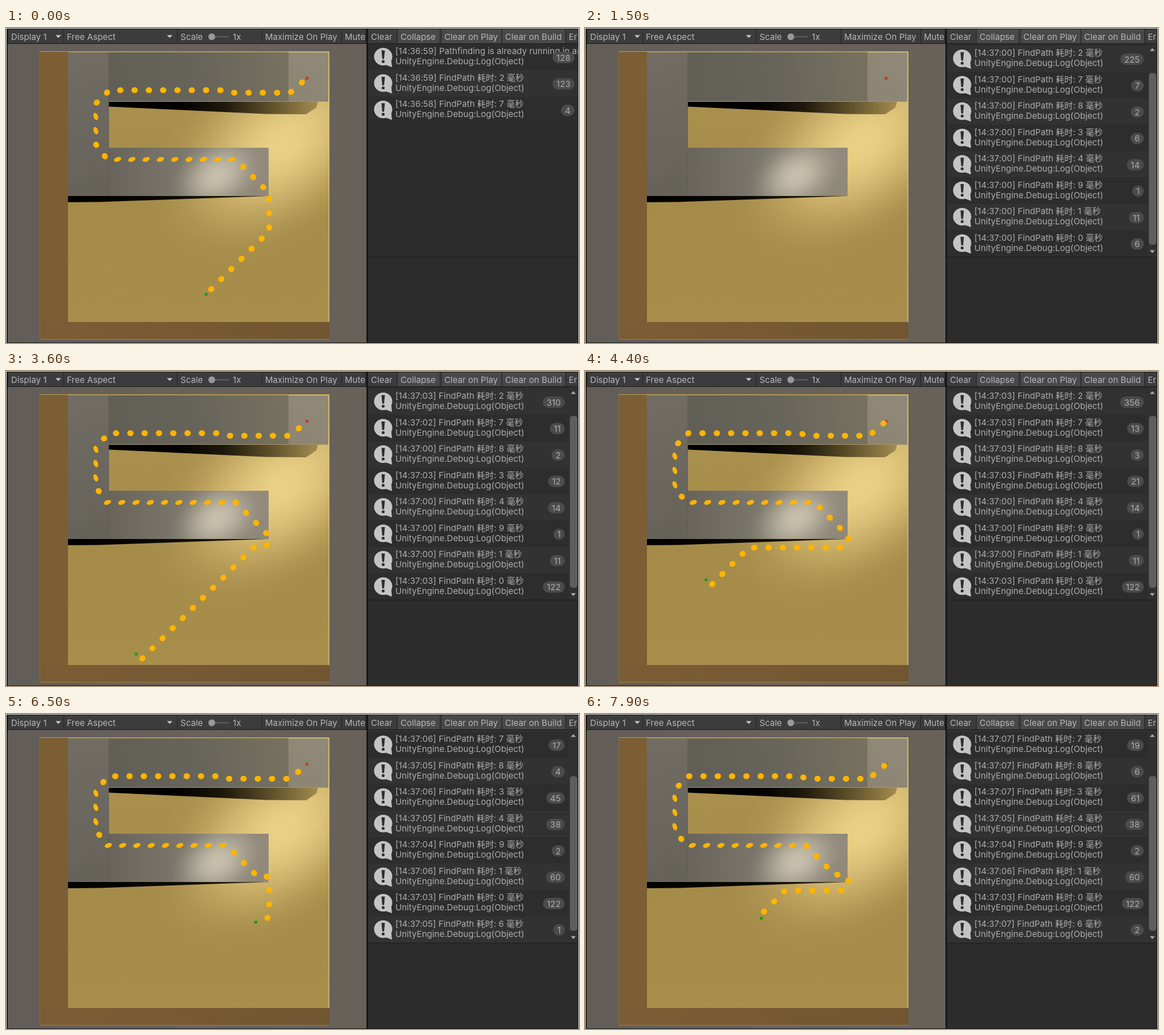
Recreate the animation shown at these times as an HTML page with a canvas. Size 1008 by 555 pixels, loop 8000 ms.

```html
<!DOCTYPE html>
<html lang="en">
<head>
<meta charset="utf-8">
<style>
html, body { margin: 0; width: 100%; height: 100%; overflow: hidden; background: #191919; }
canvas { display: block; }
</style>
</head>
<body>
<canvas id="stage" width="1008" height="555"></canvas>
<script>
const LOOP = 8000, STEP = 100, ROW = 46.5, LIST_TOP = 28, LIST_H = 375, SPACING = 25.15;
const FONT = '15px Inter, "Noto Sans CJK SC", "Noto Sans CJK", sans-serif';
let g;

function rect(x, y, w, h, color) { g.fillStyle = color; g.fillRect(x, y, w, h); }
function poly(color, ...points) {
  g.fillStyle = color;
  g.beginPath();
  for (const [x, y] of points) g.lineTo(x, y);
  g.fill();
}
function ellipse(x, y, rx, ry, color, angle = 0) {
  g.fillStyle = color;
  g.beginPath();
  g.ellipse(x, y, rx, ry, angle, 0, 2 * Math.PI);
  g.fill();
}
function pill(x, y, w, h, r, color) {
  g.fillStyle = color;
  g.beginPath();
  g.roundRect(x, y, w, h, r);
  g.fill();
}
function text(s, x, y, color = '#b8b8b8') { g.fillStyle = color; g.fillText(s, x, y); }
function clip(x, y, w, h) {
  g.beginPath();
  g.rect(x, y, w, h);
  g.clip();
}
function linear(x0, y0, x1, y1, ...colors) {
  const grad = g.createLinearGradient(x0, y0, x1, y1);
  colors.forEach((c, i) => grad.addColorStop(i / (colors.length - 1), c));
  return grad;
}
// Soft tilted light spot, clipped to a box
function glow(box, cx, cy, r, squash, angle, rgb, alpha) {
  g.save();
  clip(...box);
  g.translate(cx, cy);
  g.rotate(angle);
  g.scale(1, squash);
  const grad = g.createRadialGradient(0, 0, 0, 0, 0, r);
  for (let p = 0; p <= 1; p += .125) {
    grad.addColorStop(p, `rgba(${rgb},${alpha * (1 + Math.cos(Math.PI * p)) / 2})`);
  }
  ellipse(0, 0, r, r, grad);
  g.restore();
}
function arrow(x, y, w, h, color = '#c4c4c4') { poly(color, [x - w, y - h], [x + w, y - h], [x, y + h]); }

function drawScene() {
  rect(3, 28, 631, 526, linear(3, 0, 634, 0, '#625d57', '#68625b', '#67615a'));
  rect(59, 42, 51, 507, '#7c5e35');
  rect(59, 518, 510, 31, linear(59, 0, 569, 0, '#7b5d35', '#715631'));
  rect(109, 42, 460, 476, linear(0, 42, 0, 518, '#ad934f', '#a58b49', '#a78e4b'));
  glow([109, 42, 460, 476], 485, 205, 270, .62, -.65, '240,214,138', .92);
  // Raised walkway
  rect(109, 43, 72, 253, linear(109, 43, 181, 296, '#716d65', '#65625a'));
  rect(181, 43, 316, 87, linear(181, 100, 497, 60, '#615e56', '#67645b', '#77725f'));
  rect(497, 43, 70, 87, linear(497, 130, 567, 43, '#8d8572', '#908979'));
  rect(181, 211, 281, 85, linear(181, 0, 462, 0, '#68645c', '#7e796d', '#918a7a'));
  glow([181, 211, 281, 85], 372, 260, 98, .72, -.6, '210,202,182', .85);
  rect(180, 43, 1, 253, 'rgba(90,86,76,.5)');
  rect(181, 129, 386, 1, '#a5966c');
  // Shadows
  poly(linear(300, 0, 549, 0, '#000', '#1d180c', '#5f502a', '#a38c50'),
    [181, 130], [549, 130], [546, 140], [528, 152], [458, 151.5], [181, 138.5]);
  poly(linear(109, 0, 462, 0, '#000', '#0b0904', '#2c2513'), [109, 296], [462, 296], [165, 306.5], [109, 307]);
  // Rim of the floor
  rect(59, 41, 510, 1, '#b99d52');
  rect(497, 42, 71, 1, '#e6ca78');
  rect(567, 42, 2, 476, 'rgba(225,196,110,.6)');
  rect(59, 42, 1, 507, '#8b6c3d');
  rect(59, 548, 510, 1, '#a08444');
}

// Labels start a little after the separator on their left
function drawToolbar(x, w, labels) {
  g.save();
  clip(x, 2, w, 25);
  rect(x, 2, w, 25, '#3c3c3c');
  for (const [name, left, pressed] of labels) {
    if (pressed) rect(left - 6, 2, g.measureText(name).width + 12, 25, '#494949');
    rect(left - 6, 2, 1, 25, '#232323');
    text(name, left, 20.5);
  }
  g.restore();
}

function drawWindow() {
  rect(0, 0, 1008, 555, '#191919');
  drawScene();
  drawToolbar(3, 630, [['Display 1', 9], ['Free Aspect', 107], ['Scale', 307], ['Maximize On Play', 456], ['Mute', 596]]);
  drawToolbar(637, 369, [['Clear', 642], ['Collapse', 694, true], ['Clear on Play', 771, true],
    ['Clear on Build', 878, true], ['Error Pause', 990]]);
  text('1x', 399, 20.5);
  arrow(92, 15, 5, 2.5);
  arrow(288, 15, 5, 2.5);
  rect(362, 14.5, 30, 2, '#606060');
  ellipse(362, 15.5, 6, 6, '#999');
  rect(637, 28, 369, 526, '#2c2c2c');
  rect(637, 403, 369, 1, '#1c1c1c');
  rect(0, 0, 1008, 1, '#eee');
  rect(0, 0, 1, 555, '#eee');
  rect(1007, 0, 1, 555, '#eee');
}

// Key points of the dragged target: time, x, y
const ROUTE = [[0, 352, 469], [500, 352, 469], [1300, 468, 350], [2100, 440, 345], [2700, 468, 371], [3300, 235, 548],
  [4400, 213, 368], [5000, 236, 520], [5800, 212, 456], [6400, 451, 368], [7700, 302, 354], [7900, 310, 360]];
// Corners of the walkway part of the path
const WALK = [[388, 231.5], [178, 231.5], [158, 205], [158, 133], [182, 109.5], [378, 109.5], [391, 114], [500, 114], [530, 88]];

function targetAt(t) {
  const i = ROUTE.findIndex(p => p[0] > t);
  if (i < 1) return ROUTE[i < 0 ? ROUTE.length - 1 : 0].slice(1);
  const a = ROUTE[i - 1], b = ROUTE[i], f = (t - a[0]) / (b[0] - a[0]);
  return [a[1] + (b[1] - a[1]) * f, a[2] + (b[2] - a[2]) * f];
}

// Diagonal first, then straight to the ramp, then along the walkway
function buildPath(x, y, squareCorner) {
  const diagonal = Math.min(Math.abs(463 - x), Math.max(0, y - 311));
  const cx = x + diagonal * Math.sign(463 - x), cy = y - diagonal;
  const r = Math.max(0, Math.min(8, 463 - cx));
  const ramp = squareCorner ? [[455, 283], [439, 283]] : [[404, 231.5]];
  return [[x, y], [cx, cy], [463 - r, cy], [463, cy - r], [463, 291], ...ramp, ...WALK];
}

// Dots are slim and tilted on the straight parts of the lower walkway
function drawDot(x, y, dx, dy) {
  const slim = y > 130 && y < 235 && Math.min(Math.abs(dx), Math.abs(dy)) < 1;
  if (slim) ellipse(x, y, 6.6, 3.9, '#ffb400', Math.atan2(dy, dx) - .36);
  else ellipse(x, y, 5.6, 5.2, '#ffb400', Math.atan2(dy, dx));
}

function drawDots(path) {
  let next = SPACING / 2;
  for (let i = 1; i < path.length; i++) {
    const [x, y] = path[i - 1], dx = path[i][0] - x, dy = path[i][1] - y, length = Math.hypot(dx, dy);
    for (; next < length; next += SPACING) drawDot(x + dx * next / length, y + dy * next / length, dx, dy);
    next -= length;
  }
}

function drawPath(t) {
  rect(527, 86, 5, 5, '#c63a32');
  if (t >= 1400 && t < 2100) return;
  const [x, y] = targetAt(t), start = targetAt(t - STEP);
  rect(x - 2.5, y - 2.5, 5, 5, '#14a014');
  // The path follows one step late and ends at the floor's edge
  if (start[1] < 521) drawDots(buildPath(...start, t >= 2100 && t < 3300 || t >= 6200));
}

// Console entries: each count grows during the first drag and once more later
const found = (ms, from, base, first, resume, until, later) =>
  ({ message: `FindPath 耗时: ${ms} 毫秒`, from, base, first, resume, until, later });
const LOGS = [
  { message: 'Pathfinding is already running in another task', from: -100, base: 128, first: 80, resume: 1500, until: 7900, later: 0 },
  found(2, -100, 123, 102, 2100, 7900, 331),
  found(7, -1000, 4, 3, 1300, LOOP, 13),
  found(8, 700, 1, 1, 3000, 7900, 4),
  found(3, 800, 1, 5, 3000, 7900, 55),
  found(4, 900, 1, 13, 5500, 6400, 24),
  found(9, 1000, 1, 0, 4900, 5000, 1),
  found(1, 1100, 1, 10, 5050, 6500, 49),
  found(0, 1300, 1, 5, 1500, 3500, 116),
  found(6, 6000, 1, 0, 7400, 7500, 1),
];

const ramp = (t, a, b) => Math.max(0, Math.min(1, (t - a) / (b - a)));
function countAt(log, t) {
  const drag = ramp(t, Math.max(0, log.from), 1500) ** 3;
  return Math.floor(log.base + log.first * drag + log.later * ramp(t, log.resume, log.until));
}

// Clock time of the latest change of a count
function stamp(log, t) {
  const now = countAt(log, t);
  while (t > log.from && countAt(log, t - STEP) === now) t -= STEP;
  const s = Math.floor((t - 550) * .00102);
  return s < 0 ? `14:36:${60 + s}` : `14:37:0${s}`;
}

function drawIcon(x, y) {
  const light = '#c4c4c4', dark = '#2d2d2d';
  ellipse(x, y, 16, 15.5, light);
  poly(light, [x + 3, y + 14], [x + 14, y + 4], [x + 15.5, y + 18.5]);
  poly(dark, [x - 3, y - 11], [x + 3, y - 11], [x + 1.6, y + 4], [x - 1.6, y + 4]);
  ellipse(x, y + 8.5, 2.6, 2.6, dark);
}

function drawConsole(t) {
  const logs = LOGS.filter(log => t >= log.from);
  const total = logs.length * ROW, scroll = Math.max(0, total - LIST_H);
  const right = scroll ? 983 : 1000;
  g.save();
  clip(637, LIST_TOP, 369, LIST_H);
  logs.forEach((log, i) => {
    const y = LIST_TOP + i * ROW - scroll, count = String(countAt(log, t));
    rect(637, y, 369, ROW, i % 2 ? '#323232' : '#2d2d2d');
    drawIcon(663.5, y + 22.5);
    text(`[${stamp(log, t)}] ${log.message}`, 685, y + 18, '#aeaeae');
    text('UnityEngine.Debug:Log(Object)', 685, y + 36, '#aeaeae');
    const w = g.measureText(count).width + 14;
    pill(right - w, y + 14, w, 20, 10, '#4b4b4b');
    text(count, right - w + 7, y + 29.5, '#aeaeae');
  });
  if (scroll) {
    const thumb = 338 * LIST_H / total;
    rect(990, LIST_TOP, 16, LIST_H, '#313131');
    pill(992, 382 - thumb, 13, thumb, 5, '#5e5e5e');
    arrow(998, 38, 4.5, -2.5, '#aaa');
    arrow(998, 394, 4.5, 2.5, '#aaa');
  }
  g.restore();
}

function use(canvas) {
  g = canvas.getContext('2d');
  g.font = FONT;
  g.letterSpacing = '0.05px';
}

const stage = document.getElementById('stage');
const backdrop = stage.cloneNode();
use(backdrop);
drawWindow();
use(stage);

const start = performance.now();
function frame() {
  const t = Math.floor((performance.now() - start) % LOOP / STEP) * STEP;
  g.drawImage(backdrop, 0, 0);
  drawPath(t);
  drawConsole(t);
  requestAnimationFrame(frame);
}
frame();
</script>
</body>
</html>
```
